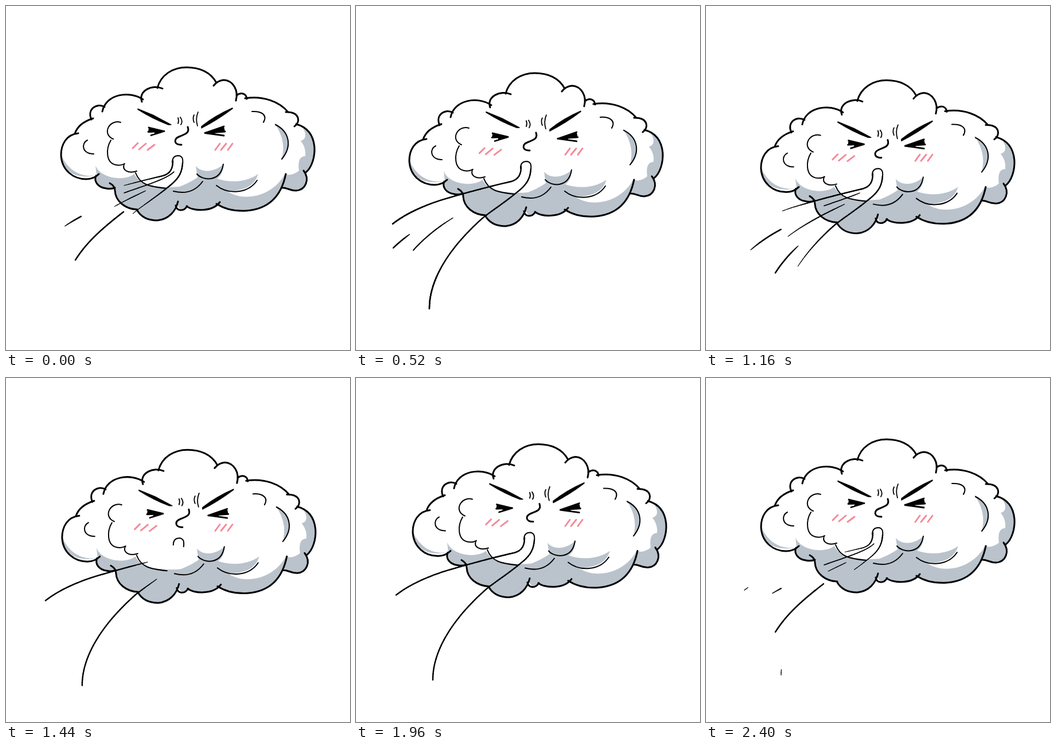
An HTML page with a canvas that plays this animation: 600x600 px, repeating every 2.44 s.

```html
<!DOCTYPE html>
<html lang="en">
<head>
<meta charset="utf-8">
<title>Blowing cloud</title>
<style>
  html, body { margin: 0; width: 100%; height: 100%; overflow: hidden; background: #fff; }
  canvas { display: block; width: 100vmin; height: 100vmin; }
</style>
</head>
<body>
<canvas id="stage" width="600" height="600"></canvas>
<script>
const ctx = document.getElementById('stage').getContext('2d');
const LOOP = 2440, STEP = 40;
const INK = '#000', SHADE = '#bac3cc', BLUSH = '#f4899a';

// Each lobe of the silhouette overlaps its neighbours slightly.
const outline = new Path2D(`
  M126 222C105 224 96 242 96 260C97 286 117 302 140 302C150 302 157 298 162 293
  M157 296C153 306 160 316 174 318Q182 320 190 317
  M181 309Q190 314 190 322C191 341 208 354 229 355
  M228 355C235 368 248 374 264 374C284 372 296 358 300 341
  M296 348C298 358 310 359 316 349
  M315 349C325 358 360 360 373 342
  M367 345C384 356 405 358 420 357C457 354 480 333 488 293
  M481 317C490 316 493 322 506 322C522 321 531 303 519 287
  M522 291C534 282 539 262 538 246C536 225 525 211 506 206
  M503 210C514 203 513 184 488 185
  M492 185C477 167 449 156 417 161
  M420 162C419 152 410 150 402 156
  M401 165C406 147 396 130 380 129Q369 130 362 139
  M367 134C357 115 337 107 315 107C291 107 270 120 264 143
  M273 144C255 136 230 148 237 167
  M239 163C216 147 174 153 168 184
  M172 176C157 168 141 181 149 198
  M152 196C136 201 124 210 120 223`);

const creases = new Path2D(`
  M200 203C181 197 166 223 187 232
  M183 234C174 249 174 273 191 277Q200 279 207 275
  M206 276C202 286 213 293 228 288
  M142 234C131 239 132 258 153 258
  M429 184C444 183 457 189 449 203
  M226 291C234 312 250 315 279 318
  M292 323C315 329 332 321 343 306
  M333 293C343 305 374 308 379 276
  M367 313C387 329 422 328 438 304
  M470 207C494 219 500 244 481 267`);

const shades = new Path2D(`
  M97 262C100 288 120 304 161 295C135 300 112 291 97 262Z
  M156 278C164 300 205 307 224 293C233 314 270 318 303 315Q321 308 334 299L331 279
  C341 291 362 291 379 276Q379 294 368 301C387 308 417 309 440 293
  C433 314 417 322 386 323C415 343 466 332 487 292C482 332 455 357 415 358
  C396 358 380 352 370 345C355 358 335 358 316 350C311 357 301 357 299 345
  C293 377 241 384 228 355C205 354 190 340 190 318C165 322 154 310 158 296Z
  M468 204C494 216 501 244 481 267C487 244 482 224 468 204Z
  M514 235C525 233 524 220 516 211C533 217 540 238 538 254C537 270 531 283 522 290
  C531 306 522 321 506 322Q494 322 483 316L488 292C492 298 506 292 511 287
  C509 271 512 262 522 262Q524 248 514 235Z`);

const nose = new Path2D('M317 211C321 222 311 224 304 227C290 232 294 243 306 242');
const mouth = new Path2D('M290 273C290 263 296 261 301 261C308 262 309 267 308 276');
const leftBrow = new Path2D('M230 179.5L258 191L288 207L283 207Q256 197 230 180.5Z');
const rightBrow = new Path2D('M395 178Q365 191 341 210L341 213Q370 198 395 179Z');
const frown = new Path2D('M300 195Q302 200 300 205M304 194Q309 201 305 207M335 185Q330 197 334 209M328 190Q325 196 328 203');
const leftEye = new Path2D('M249 212L276 218.5L248 219.5M276 218.5L253 225.5M260 215L276 218.5L260 223Z');
const rightEye = new Path2D('M380 210L347 221.5L382 219M347 221.5L380 226M364 216L347 221.5L364 223Z');
const leftBlush = new Path2D('M221 248L230 239M232 250L244 240M247 251L259 242');
const rightBlush = new Path2D('M365 251L373 240M375 251L384 240M387 251L395 240');

// Piecewise linear value through [x, y] points.
function ramp(x, points) {
  if (x <= points[0][0]) return points[0][1];
  for (let i = 1; i < points.length; i++) {
    const [x0, y0] = points[i - 1], [x1, y1] = points[i];
    if (x < x1) return y0 + (y1 - y0) * (x - x0) / (x1 - x0);
  }
  return points[points.length - 1][1];
}

function streak(d, width, head, tail) {
  const path = document.createElementNS('http://www.w3.org/2000/svg', 'path');
  path.setAttribute('d', d);
  const length = path.getTotalLength();
  return { at: s => path.getPointAtLength(s * length), width, head, tail };
}

// Head and tail give the visible part of a streak by gust age in ms.
const mainHead = [[-50, 0], [220, 1]];
const mainTail = [[329, 0], [460, .36], [620, .8], [745, .965], [780, 1]];
const mainStreaks = [
  streak('M291 270C291 286 285 294 270 297C235 305 190 317 150 329C120 339 90 352 67 370', 2.4, mainHead, mainTail),
  streak('M308 274C307 292 300 302 285 314C262 333 240 347 225 359C175 403 131 460 131 518', 2.4, mainHead, mainTail)
];
const sideStreaks = [
  streak('M293 289C280 302 245 312 206 326', 1.6, [[-330, 0], [-140, 1]], [[-20, 0], [140, .3], [240, 1]]),
  streak('M262 313C235 327 215 335 187 351C160 366 130 386 103 416', 2, [[-60, 0], [220, 1]], [[0, .1], [140, .12], [260, .53], [420, 1]]),
  streak('M131 367Q95 386 68 412', 2.3, [[-25, 0], [175, 1]], [[140, 0], [260, .52], [370, 1]]),
  streak('M205 359C165 390 140 413 121 443', 2.4, [[-370, 0], [-110, 1]], [[10, 0], [60, .1], [140, .48], [255, 1]])
];
const gusts = [
  { start: 260, streaks: [...mainStreaks, ...sideStreaks] },
  { start: 1020, streaks: [...mainStreaks, ...sideStreaks] },
  { start: 1650, streaks: mainStreaks },
  { start: 2380, streaks: [...mainStreaks, ...sideStreaks] }
];

function drawStreak(s, age) {
  const head = ramp(age, s.head), tail = ramp(age, s.tail);
  if (head - tail < .005) return;
  const count = Math.ceil((head - tail) * 60);
  let from = s.at(tail);
  for (let i = 1; i <= count; i++) {
    const u = tail + (head - tail) * i / count, to = s.at(u);
    const headTaper = head < 1 ? (head - u) * 4 : 1;
    const tailTaper = tail > 0 ? (u - tail) * 7 : 1;
    ctx.lineWidth = 1.1 + (s.width - 1.1) * Math.min(1, headTaper, tailTaper);
    ctx.beginPath();
    ctx.moveTo(from.x, from.y);
    ctx.lineTo(to.x, to.y);
    ctx.stroke();
    from = to;
  }
}

function stroke(path, width, color = INK) {
  ctx.lineWidth = width;
  ctx.strokeStyle = color;
  ctx.stroke(path);
}

function solid(path, width) {
  ctx.fillStyle = INK;
  ctx.fill(path);
  stroke(path, width);
}

function shifted(dx, dy, draw) {
  ctx.save();
  ctx.translate(dx, dy);
  draw();
  ctx.restore();
}

function draw(t) {
  const key = values => ramp(t, [0, 600, 1180, 1780, 2400].map((time, i) => [time, values[i]]));
  const x = key([0, -3.5, 0, 4.2, 0]);
  const y = key([0, 11.5, 23, 12, 0]);
  const squeeze = key([0, 1, 0, 1, 0]);

  ctx.fillStyle = '#fff';
  ctx.fillRect(0, 0, 600, 600);
  ctx.lineCap = ctx.lineJoin = 'round';

  shifted(x, y, () => {
    ctx.fillStyle = SHADE;
    ctx.fill(shades);
    stroke(outline, 3);
    stroke(creases, 2);
    stroke(nose, 3);
    stroke(mouth, 2);
    shifted(-9 * squeeze, 0, () => solid(leftEye, 2.8));
    shifted(9 * squeeze, 0, () => solid(rightEye, 2.8));
    shifted(0, -5.5 * squeeze, () => {
      solid(leftBrow, 1.4);
      solid(rightBrow, 1.4);
      stroke(frown, 1.8);
    });
    for (const { start, streaks } of gusts)
      for (const wrap of [-LOOP, 0, LOOP])
        for (const s of streaks) drawStreak(s, t - start + wrap);
  });
  shifted(x * 1.9, y * .87, () => stroke(leftBlush, 2.9, BLUSH));
  shifted(0, y * .85, () => stroke(rightBlush, 2.9, BLUSH));
}

const begin = performance.now();
function frame() {
  const t = (performance.now() - begin) % LOOP;
  draw(Math.floor(t / STEP) * STEP);
  requestAnimationFrame(frame);
}
frame();
</script>
</body>
</html>
```
